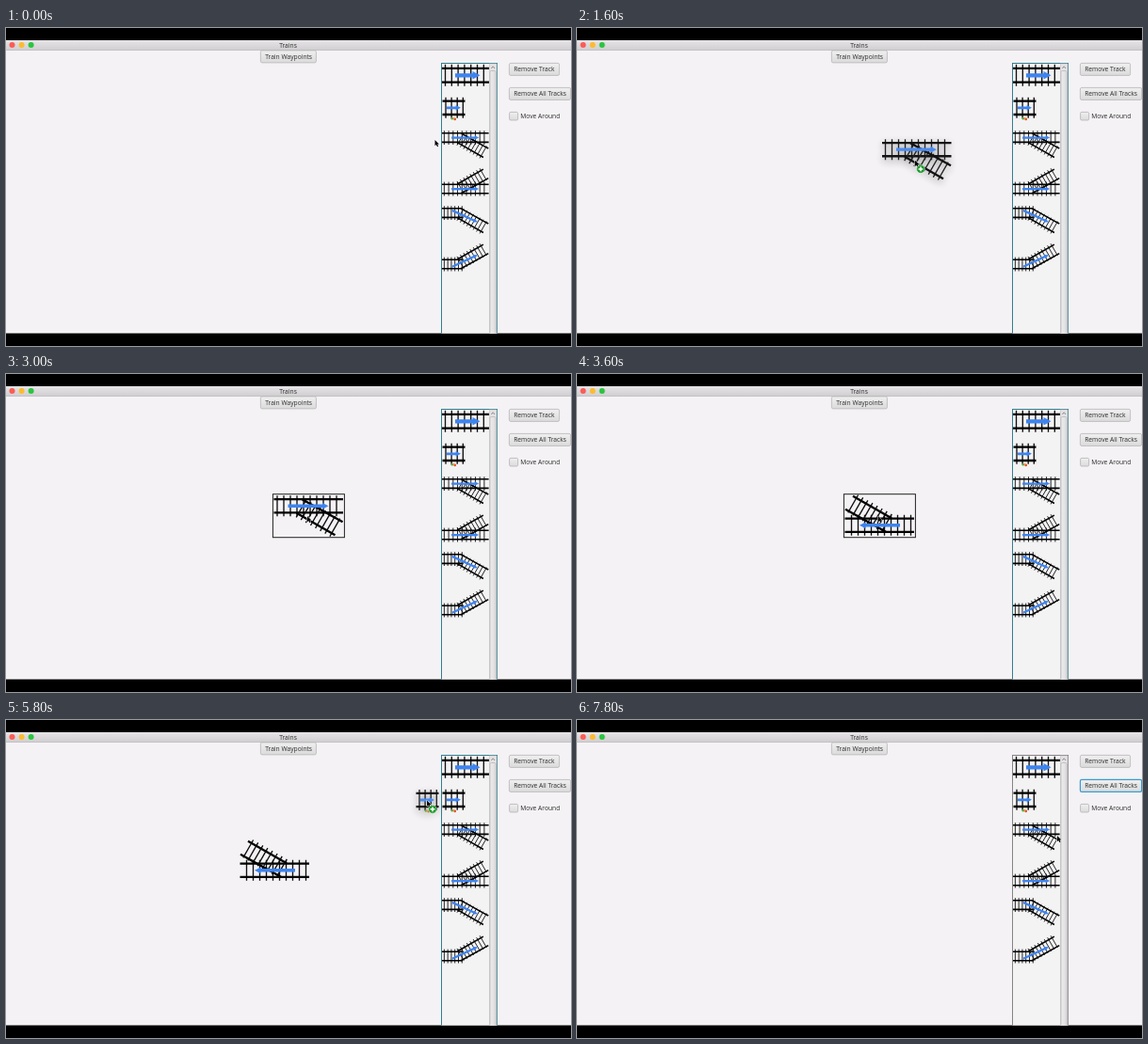
An HTML page for the animation above (8000 ms loop, 600x338 px).

```html
<!DOCTYPE html>
<html lang="en">
<head>
<meta charset="utf-8">
<title>Trains</title>
<style>
html, body { margin: 0; width: 100%; height: 100%; overflow: hidden; background: #000; }
svg { display: block; width: 100%; height: 100%; }
text { font: 6.7px "Open Sans", "Noto Sans", sans-serif; fill: #2c2c2c; }
.rail { stroke: #000; stroke-width: 2.3; fill: none; }
.tie { stroke: #111; stroke-width: 1.35; fill: none; }
.lift { filter: drop-shadow(0 3px 4px rgba(0, 0, 0, .35)); opacity: .92; }
</style>
</head>
<body>
<svg viewBox="0 0 600 338">
  <defs>
    <linearGradient id="bar" x2="0" y2="1"><stop stop-color="#e6e4e6"/><stop offset="1" stop-color="#d0ced0"/></linearGradient>
    <linearGradient id="face" x2="0" y2="1"><stop stop-color="#f0eff0"/><stop offset="1" stop-color="#dcdbdc"/></linearGradient>
    <linearGradient id="thumb"><stop stop-color="#efeeef"/><stop offset="1" stop-color="#dcdadc"/></linearGradient>
    <clipPath id="win"><rect y="13" width="600" height="311.5"/></clipPath>
  </defs>
  <rect width="600" height="338"/>
  <g clip-path="url(#win)">
    <rect y="13" width="600" height="312" fill="#f4f2f4"/>
    <rect y="13" width="600" height="10.5" fill="url(#bar)"/>
    <path d="M0 23.5H600" stroke="#b9b7b9" stroke-width=".7"/>
    <circle cx="6.5" cy="18" r="3" fill="#fc5b57"/>
    <circle cx="16.6" cy="18" r="3" fill="#fdbb2f"/>
    <circle cx="26.6" cy="18" r="3" fill="#2bc53f"/>
    <text x="299.5" y="20.7" text-anchor="middle">Trains</text>
    <g id="ui"></g>
    <g id="palette"></g>
    <g id="big"></g>
    <rect id="frame" width="76" height="46" fill="none" stroke="#222"/>
    <g id="small"></g>
    <g id="cursor">
      <path d="M0 0V6.3L1.4 5L2.5 7.3L3.6 6.8L2.6 4.6H4.5Z" stroke="#fff" stroke-width=".9" paint-order="stroke"/>
      <g id="badge">
        <circle cx="6" cy="9.3" r="4.4" fill="#1e9b2c" stroke="#fff" stroke-width=".5"/>
        <path d="M3.6 9.3H8.4M6 6.9V11.7" stroke="#fff" stroke-width="1.5"/>
      </g>
    </g>
  </g>
</svg>
<script>
const $ = id => document.getElementById(id);
const LOOP = 8000, STEP = 200;

const path = (cls, d) => `<path class="${cls}" d="${d}"/>`;
const place = (x, y, sx, sy, body) => `<g transform="translate(${x} ${y}) scale(${sx} ${sy})">${body}</g>`;

function arrow(x1, y1, x2, y2, w) {
  const len = Math.hypot(x2 - x1, y2 - y1), neck = len - w * 1.9;
  const turn = Math.atan2(y2 - y1, x2 - x1) * 180 / Math.PI;
  return `<path fill="#3d84f0" transform="translate(${x1} ${y1}) rotate(${turn})"
    d="M0 ${-w / 2}H${neck}V${-w}L${len} 0L${neck} ${w}V${w / 2}H0Z"/>`;
}

function straight(len, h, first, gap, inset) {
  let ties = '';
  for (let x = first; x < len; x += gap) ties += `M${x} .5V${h - .5}`;
  return path('tie', ties) + path('rail', `M0 ${inset}H${len}M0 ${h - inset}H${len}`);
}

function branch() {
  let ties = '';
  for (let i = 0; i < 8; i++) {
    const x = 34.5 + i * 5.1, y = 4.6 + i * 2.9;
    ties += `M${x} ${y}l-10.8 18.9`;
  }
  return path('tie', ties) + path('rail', 'M30 4.5L73 28.5M24 19L65 42.5');
}

const turnout = straight(73.5, 23, 3.5, 7, 4.4) + branch() + arrow(15, 11.5, 58, 11.5, 3.4);
const bend = straight(32, 23, 3.5, 5.6, 4.4) + branch() + arrow(16, 7.5, 56, 26, 3.4);
const signal = `<circle cx="10.3" cy="23" r="1.3" fill="#4aa83c"/><circle cx="13.2" cy="23.6" r="1.4" fill="#e8542c"/>
  <circle cx="11.8" cy="22.4" r=".9" fill="#e9a23a"/>`;
const short = straight(24, 23, 3.5, 6.1, 4.3) + arrow(4.5, 11.5, 19.5, 11.5, 2.8) + signal;
const long = straight(50, 24, 3.5, 6.8, 4.6) + arrow(14, 12, 40.5, 12, 4.2);

const button = (x, y, w, label, id = '') =>
  `<rect id="${id}" x="${x}" y="${y}" width="${w}" height="13" rx="1.6" fill="url(#face)" stroke="#b8b6b8" stroke-width=".8"/>
  <text x="${x + 4.8}" y="${y + 9}">${label}</text>`;

$('ui').innerHTML = button(270.4, 23.9, 59, 'Train Waypoints') +
  button(534.4, 37.4, 53.2, 'Remove Track') +
  button(534.4, 63.4, 65.2, 'Remove All Tracks', 'clear') +
  `<rect x="534.6" y="89.4" width="9" height="8.6" rx="1.3" fill="url(#face)" stroke="#b4b2b4" stroke-width=".8"/>
  <text x="546.3" y="96.3">Move Around</text>`;

const K = .675;
$('palette').innerHTML = `<rect id="edge" x="462.5" y="37.5" width="59" height="300" fill="#f4f3f4"/>
  <rect x="513.3" y="38" width="7.7" height="290" fill="#e4e2e4" stroke="#c6c4c6" stroke-width=".6"/>
  <path d="M515.3 43L517.2 40.8L519.1 43" fill="none" stroke="#777" stroke-width=".8"/>
  <rect x="514" y="45.5" width="6.2" height="290" rx="1.5" fill="url(#thumb)" stroke="#b4b2b4" stroke-width=".7"/>` +
  place(463, 38.3, 1, 1, long) + place(463.5, 73.3, 1, 1, short) +
  place(463, 108.8, K, K, turnout) + place(463, 178.8, K, -K, turnout) +
  place(463, 188.8, K, K, bend) + place(463, 258.8, K, -K, bend);
$('big').innerHTML = turnout;
$('small').innerHTML = short;

// [time, x, y]
const route = [
  [0, 455.5, 119], [200, 459, 119], [600, 485, 117], [800, 478, 117], [1200, 441, 122],
  [1800, 318, 150], [2400, 318, 150], [2600, 320, 151], [4000, 320, 151], [4600, 284, 151],
  [5000, 284, 151], [5600, 476, 84], [6400, 360, 90], [6600, 391.5, 97], [7200, 560, 72],
  [7600, 567, 72], [7800, 510, 123]
];

function along(keys, t) {
  const i = keys.findIndex(k => k[0] > t);
  if (i < 0) return keys[keys.length - 1].slice(1);
  const [a, b] = [keys[i - 1], keys[i]], p = (t - a[0]) / (b[0] - a[0]);
  return [1, 2].map(n => a[n] + (b[n] - a[n]) * p);
}

const show = (id, on) => $(id).setAttribute('display', on ? 'inline' : 'none');
const move = (id, x, y, extra = '') => $(id).setAttribute('transform', `translate(${x} ${y}) ${extra}`);

function draw(time) {
  const t = Math.floor(time % LOOP / STEP) * STEP;
  const [x, y] = along(route, t);
  const dragBig = t >= 800 && t < 1800, dragSmall = t >= 5800 && t < 6400;
  const cleared = t >= 7400;

  let bx = 283, by = 127;
  if (dragBig) [bx, by] = [x - 35, y - 23];
  else if (t >= 3000) {
    const p = Math.min(1, Math.max(0, (t - 4000) / 600));
    [bx, by] = [284.5 - 36 * p, 128.8 - p];
  }
  show('big', t >= 800 && !cleared);
  move('big', bx, by, t >= 3200 ? 'rotate(180 36.75 21.75)' : '');
  $('big').setAttribute('class', dragBig ? 'lift' : '');
  show('frame', t >= 3000 && t < 4800);
  move('frame', bx - 1.1, by - 1.1);

  show('small', t >= 5800 && !cleared);
  move('small', dragSmall ? x - 11.5 : 348.7, dragSmall ? y - 12 : 78.2);
  $('small').setAttribute('class', dragSmall ? 'lift' : '');

  move('cursor', x, y);
  show('badge', dragBig || dragSmall);

  $('edge').setAttribute('stroke', cleared ? '#858385' : '#337f91');
  $('clear').setAttribute('stroke', cleared ? '#3b9bd0' : '#b8b6b8');
  $('clear').setAttribute('stroke-width', cleared ? 1.2 : .8);
}

const begin = performance.now();
function tick() {
  draw(performance.now() - begin);
  requestAnimationFrame(tick);
}
tick();
</script>
</body>
</html>
```
